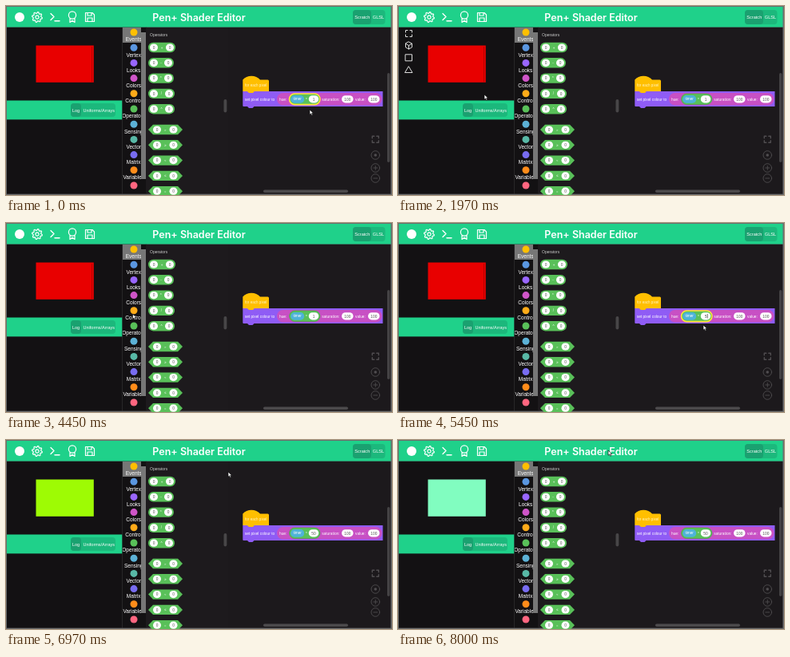
An HTML page with a canvas for the animation above (8030 ms loop, 483x237 px).

```html
<!DOCTYPE html>
<html>
<head>
<meta charset="utf-8">
<title>Shader editor</title>
<style>
  html, body { margin: 0; width: 100%; height: 100%; overflow: hidden; background: #000; }
  canvas { display: block; width: 483px; height: 237px; }
</style>
</head>
<body>
<canvas id="stage" width="483" height="237"></canvas>
<script>
const ctx = document.getElementById('stage').getContext('2d');
const LOOP = 8030;
const GREEN = '#1fd18a', OPERATOR = '#59c059';
const PANEL = '#131113', FLYOUT = '#1d1a1d', WORKSPACE = '#1c191c', FRAME = '#6c6c6c';
const SANS = '"Liberation Sans", Arial, sans-serif';

// Pointer keyframes: [time, x, y]
const POINTER = [
  [0, 380, 130], [270, 380, 130], [950, 108, 111], [4300, 108, 111],
  [4850, 382, 128], [5900, 382, 128], [6150, 379, 139], [6400, 379, 139],
  [6970, 278, 40], [7350, 263, 13], [LOOP, 263, 13]
];
const CLICK_AT = 4950, FIRST_DIGIT = 5350, SECOND_DIGIT = 5720, EDIT_END = 6050;
const HUE_SPEED = 0.066; // degrees per ms once the timer is multiplied by 50

const CATEGORIES = [
  ['Events', '#ffbf00'], ['Vertex', '#5a96e0'], ['Looks', '#9966ff'], ['Colors', '#cf55c8'],
  ['Control', '#ffab19'], ['Operators', OPERATOR], ['Sensing', '#5cb1d6'], ['Vector', '#58b8a6'],
  ['Matrix', '#786cf0'], ['Variables', '#ff8c1a'], ['My Blocks', '#ff6680']
];

const clamp = x => Math.min(1, Math.max(0, x));
const smooth = x => x * x * (3 - 2 * x);

function sample(keys, t) {
  let i = 0;
  while (i < keys.length - 2 && t >= keys[i + 1][0]) i++;
  const a = keys[i], b = keys[i + 1];
  const p = smooth(clamp((t - a[0]) / (b[0] - a[0])));
  return a.slice(1).map((v, k) => v + (b[k + 1] - v) * p);
}

function previewColor(t) {
  if (t < SECOND_DIGIT) return '#e80000';
  const hue = (t - SECOND_DIGIT) * HUE_SPEED;
  const light = 50 + 25 * clamp((t - 7000) / 1000);
  return `hsl(${hue}, 97%, ${light}%)`;
}

function box(x, y, w, h, color) {
  ctx.fillStyle = color;
  ctx.fillRect(x, y, w, h);
}

function pill(x, y, w, h, r, fill, stroke, line = 1) {
  ctx.beginPath();
  ctx.roundRect(x, y, w, h, r);
  if (fill) { ctx.fillStyle = fill; ctx.fill(); }
  if (stroke) { ctx.strokeStyle = stroke; ctx.lineWidth = line; ctx.stroke(); }
}

function disc(x, y, r, color) {
  ctx.fillStyle = color;
  ctx.beginPath();
  ctx.arc(x, y, r, 0, Math.PI * 2);
  ctx.fill();
}

function text(str, x, y, size, color = '#fff', align = 'left', font = SANS, weight = 400) {
  ctx.font = `${weight} ${size}px ${font}`;
  ctx.fillStyle = color;
  ctx.textAlign = align;
  ctx.textBaseline = 'alphabetic';
  ctx.fillText(str, x, y);
}

// Strokes an SVG path whose origin is placed at (x, y)
function icon(x, y, d, color = '#fff', line = 1.2) {
  ctx.save();
  ctx.translate(x, y);
  ctx.strokeStyle = color;
  ctx.lineWidth = line;
  ctx.lineJoin = ctx.lineCap = 'round';
  ctx.stroke(new Path2D(d));
  ctx.restore();
}

function shape(d, color, stroke) {
  const path = new Path2D(d);
  ctx.fillStyle = color;
  ctx.fill(path);
  if (stroke) { ctx.strokeStyle = stroke; ctx.lineWidth = 0.7; ctx.stroke(path); }
}

function circlePath(r) {
  return `M${r} 0A${r} ${r} 0 1 1 ${-r} 0A${r} ${r} 0 1 1 ${r} 0Z`;
}

function gearPath() {
  let d = '';
  for (let i = 0; i < 32; i++) {
    const a = (i + 0.5) * Math.PI / 16, r = i % 4 < 2 ? 6.4 : 4.9;
    d += `${i ? 'L' : 'M'}${r * Math.cos(a)} ${r * Math.sin(a)}`;
  }
  return d + 'Z' + circlePath(2.1);
}
const GEAR = gearPath();
const CORNERS = 'M-4 -1.5V-4H-1.5M1.5 -4H4V-1.5M4 1.5V4H1.5M-1.5 4H-4V1.5';

function toggle(x, y, w, h, selected) {
  pill(x, y, w, h, 4, '#1cb87c');
  pill(x, y, selected, h, 4, '#1aa170');
}

function drawHeader() {
  box(1, 1, 480.5, 25.7, GREEN);
  disc(17, 14, 6, '#fff');
  icon(39, 14, GEAR);
  icon(61, 14, 'M-5 -4.5L-1 -0.5L-5 3.5M0 4.8H6', '#fff', 1.4);
  icon(83, 11.5, circlePath(4.6) + 'M-3 3.8V9L0 6.8L3 9V3.8');
  icon(105, 14, 'M-5.5 -5.5H3L5.5 -3V5.5H-5.5ZM-3 -5.5V-2H2V-5.5M-3 5.5V1H3V5.5');
  text('Pen+ Shader Editor', 241.5, 18.7, 12.5, '#fff', 'center', 'Inter, sans-serif', 600);

  toggle(434, 5, 40.5, 18, 23);
  text('Scratch', 445.8, 16, 5.6, '#fff', 'center');
  text('GLSL', 466, 16, 5.6, '#fff', 'center');
}

function drawPreview(t, hovered) {
  box(1, 26.7, 144.5, 209, PANEL);
  box(37.5, 49.5, 72.3, 46.3, previewColor(t));
  if (t < SECOND_DIGIT) box(107, 51, 1, 45, '#b80000');

  if (hovered) {
    icon(13.5, 34.5, CORNERS, '#ddd', 1);
    icon(13.5, 49.5, 'M0 -4.5L4 -2.3V2.3L0 4.5L-4 2.3V-2.3ZM-4 -2.3L0 0L4 -2.3M0 0V4.5', '#ddd', 1);
    icon(13.5, 64.8, 'M-4 -4H4V4H-4Z', '#ddd', 1);
    icon(13.5, 80, 'M0 -4L4.5 3.5H-4.5Z', '#ddd', 1);
  }

  box(1, 118.5, 144.5, 23.9, GREEN);
  toggle(81, 122, 56, 17, 13);
  text('Log', 87.5, 132.8, 5.5, '#fff', 'center');
  text('Uniforms/Arrays', 116.3, 132.8, 5.5, '#fff', 'center');
}

function drawCategories() {
  box(145.5, 26.7, 30, 209, PANEL);
  box(146, 27, 23, 19, '#777');
  ctx.save();
  ctx.beginPath();
  ctx.rect(146, 27, 23, 203);
  ctx.clip();
  CATEGORIES.forEach(([name, color], i) => {
    const y = 33 + i * 19.2;
    disc(160, y, 4.5, color);
    text(name, 159.7, y + 11.4, 6.5, '#fff', 'center');
  });
  ctx.restore();
  box(169, 33, 6, 184, '#777');
}

function drawPalette() {
  box(175, 26.7, 103, 209, FLYOUT);
  text('Operators', 180, 37.7, 5, '#ccc');
  const widths = [34, 32, 32, 33, 33];
  ['+', '-', '*', '/', '^'].forEach((sign, i) => {
    const y = 52 + i * 19.3, w = widths[i];
    pill(178, y - 6.2, w, 12.4, 6.2, OPERATOR);
    [185, 178 + w - 7].forEach(x => numberField(x, y, '0', 10));
    text(sign, 178 + w / 2, y + 1.5, 4.5, '#fff', 'center');
  });
  ['>', '≥', '<', '≤', '='].forEach((sign, i) => {
    const y = 155 + i * 19.3;
    shape(`M178 ${y}L184 ${y - 6.2}H215L221 ${y}L215 ${y + 6.2}H184Z`, OPERATOR);
    numberField(189, y, '0', 10);
    numberField(209.5, y, '0', 10);
    text(sign, 199.3, y + 1.5, 4.2, '#fff', 'center');
  });
  pill(272.5, 117, 3.8, 16.5, 1.9, '#484648');
}

function numberField(x, y, value, w) {
  pill(x - w / 2, y - 4.6, w, 9.2, 4.6, '#fff');
  text(value, x, y + 1.8, 4.8, '#555', 'center');
}

function drawScript(t) {
  shape('M296.3 107V92.5C301 86.3 313 86 318 92.5H327.5Q329 92.5 329 94V107Z', '#ffbf00');
  text('for each pixel', 299, 101.3, 4.6, '#fff3c4');
  shape('M296.3 107H471.5V126H310.5L308.5 128H304L302 126H297.3Q296.3 126 296.3 125Z', '#8f5cf5');
  shape('M301.5 106.8H311L309 109H304Z', '#ffbf00');
  text('set pixel colour to', 298.8, 118.5, 4.8);

  pill(339, 109, 131.5, 15.5, 7.7, '#c850c4');
  text('hue:', 342, 118.5, 4.8);
  const editing = t >= CLICK_AT && t < EDIT_END;
  const glowing = t < 270 || editing;
  pill(354.5, 110, 38.5, 13.6, 6.8, OPERATOR, glowing ? '#ffe83a' : '#48a348', glowing ? 1.6 : 0.6);
  pill(356.2, 112, 17, 9.8, 4.9, '#4eb3d8');
  text('timer', 364.7, 118.4, 4.7, '#fff', 'center');
  text('*', 376, 119.3, 4.8, '#fff', 'center');

  const value = t < FIRST_DIGIT ? '1' : t < SECOND_DIGIT ? '5' : '50';
  numberField(385, 116.8, value, 12.5);
  if (editing && (t - CLICK_AT) % 1000 < 530) box(385.8 + value.length, 114, 0.7, 5.5, '#333');

  text('saturation:', 395.2, 118.5, 4.8);
  numberField(427.3, 116.8, '100', 14.5);
  text('value:', 437, 118.5, 4.8);
  numberField(460.3, 116.8, '100', 14.5);
}

function drawWorkspace(t) {
  box(278, 26.7, 203.5, 209, WORKSPACE);
  drawScript(t);
  const gray = '#504d50';
  icon(462.3, 167.3, CORNERS, gray, 1.4);
  const ring = circlePath(5.3);
  icon(462.3, 187, ring, gray, 0.9);
  disc(462.3, 187, 1.8, gray);
  icon(462.3, 203, ring + 'M-2.4 0H2.4M0 -2.4V2.4', gray, 0.9);
  icon(462.3, 216, ring + 'M-2.4 0H2.4', gray, 0.9);
  pill(322, 230.5, 106, 3.4, 1.7, '#4c4a4c');
  pill(477, 84, 3.4, 112, 1.7, '#444244');
}

function drawPointer(x, y) {
  ctx.save();
  ctx.translate(x, y);
  shape('M0 0V6.2L1.5 4.9L2.6 7.2L3.7 6.7L2.7 4.4H4.7Z', '#fff', '#111');
  ctx.restore();
}

function draw(t) {
  const [px, py] = sample(POINTER, t);
  box(0, 0, 483, 237, FRAME);
  drawHeader();
  drawPreview(t, px < 145 && py > 27 && py < 119);
  drawCategories();
  drawPalette();
  drawWorkspace(t);
  drawPointer(px, py);
}

function tick(now) {
  draw(now % LOOP);
  requestAnimationFrame(tick);
}
draw(0);
requestAnimationFrame(tick);
</script>
</body>
</html>
```
